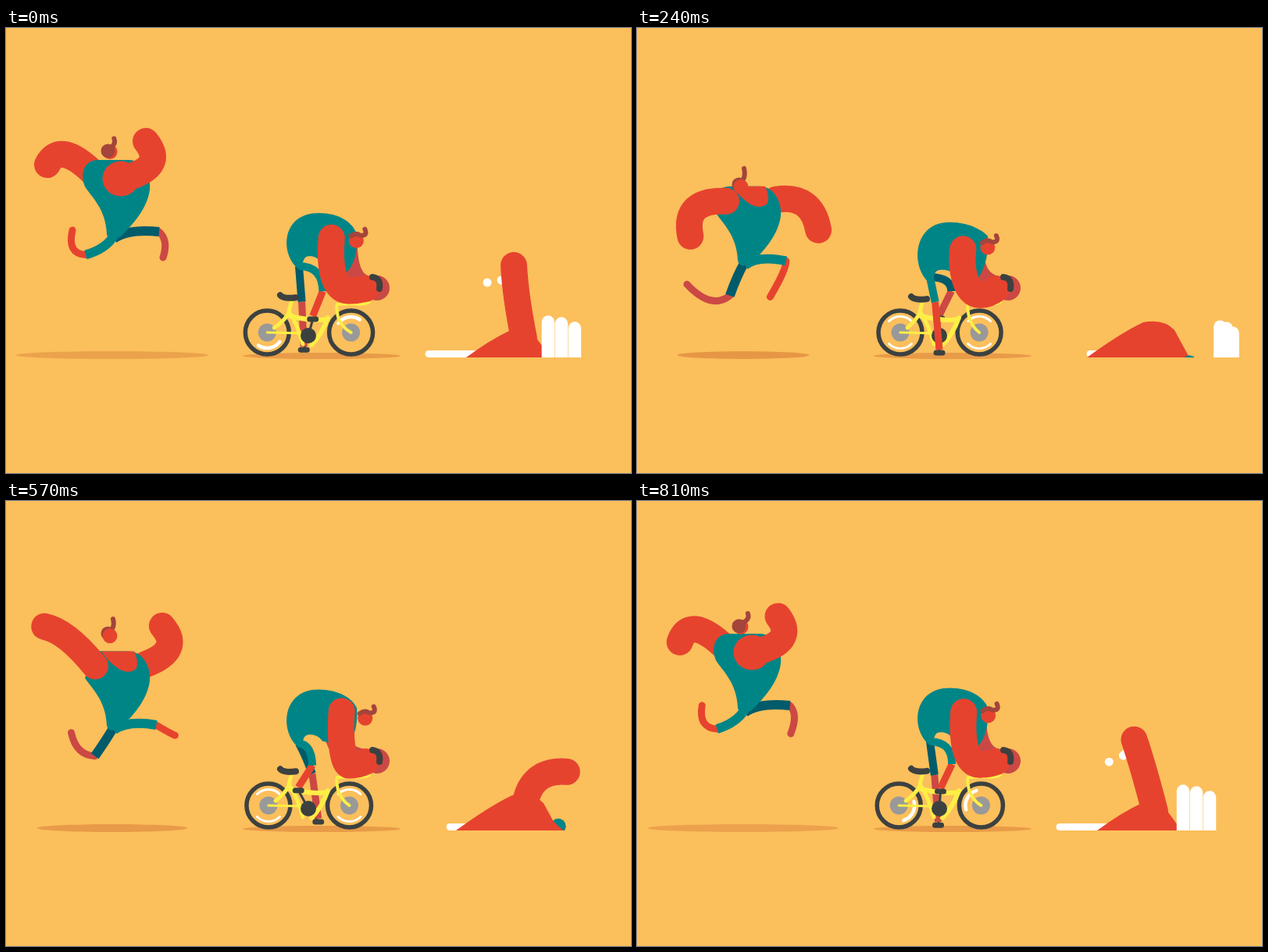
Animation, 800 px wide and 570 px high, one loop 0.84 s. Source, as an HTML page with a canvas:

```html
<!DOCTYPE html>
<html lang="en">
<head>
<meta charset="utf-8">
<title>Triathlon</title>
<style>
html, body { margin: 0; width: 100%; height: 100%; overflow: hidden; background: #fbbf5b; }
canvas { display: block; }
</style>
</head>
<body>
<canvas id="stage" width="800" height="570"></canvas>
<script>
const ctx = document.getElementById('stage').getContext('2d');
const { cos, sin, max, min, PI, exp, floor } = Math;
const LOOP = 840, HALF = LOOP / 2, STEP = 30;
const SAND = '#fbbf5b', RED = '#e6432f', PINK = '#cb4844', TEAL = '#008587', DEEP = '#005b6a',
  BROWN = '#a3453b', YELLOW = '#fdee46', DARK = '#3c4140', GREY = '#999', WHITE = '#fff';

function fill(color, d) {
  ctx.fillStyle = color;
  ctx.fill(new Path2D(d));
}
function line(color, width, d, cap = 'round') {
  ctx.strokeStyle = color;
  ctx.lineWidth = width;
  ctx.lineCap = cap;
  ctx.lineJoin = 'round';
  ctx.stroke(new Path2D(d));
}
function oval(color, x, y, rx, ry = rx) {
  ctx.fillStyle = color;
  ctx.beginPath();
  ctx.ellipse(x, y, rx, ry, 0, 0, 2 * PI);
  ctx.fill();
}
function arc(color, width, x, y, r, mid, span) {
  ctx.strokeStyle = color;
  ctx.lineWidth = width;
  ctx.lineCap = 'round';
  ctx.beginPath();
  ctx.arc(x, y, r, (mid - span / 2) * PI / 180, (mid + span / 2) * PI / 180);
  ctx.stroke();
}

// Runner and swimmer share a beat: s runs from -1 to 1 within each half loop,
// early falls to 0 in its first third, and the body turns over (open) every half loop.
function beat(t) {
  const phase = ((t + HALF / 2) % HALF) / HALF * 2 - 1;
  const contact = phase === -1;
  const s = contact ? 1 : phase;
  return { s, contact, early: max(0, -phase - .3), open: t > HALF / 2 && t <= HALF * 1.5 };
}

// Runner: y is measured from the shoulder line, which follows a parabola.
function runner({ s, contact, early, open }) {
  const q = s * s;
  oval(`rgba(200,95,40,${.3 + .16 * q})`, 136, 419, 123 - 52.5 * q, 5);
  ctx.save();
  ctx.translate(0, 169 + 46 * q);

  const backArm = () => line(RED, 34,
    `M114 19Q${69 + 12 * s} ${-26 + 76 * early} ${53 - 11 * s + 8 * q} ${6 - 32 * s + 3 * q - 45 * q * s}`);
  const frontArm = () => {
    const shift = open ? 0 : -28;
    const x = 207 - 9 * s + 10 * q - 16 * q * s, y = -24 - 12 * s + 125 * early;
    line(RED, 34, `M${178 + shift} ${open ? 17 : 24}Q${234 - 14 * q + shift} ${10 - 8 * s - 10 * q} ${x + shift} ${y}`);
    if (!open) oval(RED, 147, 24, 23.5, 22.5);
  };
  const backLeg = (skin, cloth) => {
    const x = 102 + 23 * q, y = 121.5 + 25 * q;
    line(skin, 9, `M${x} ${y}Q${x - 24} ${y - 1 + 36 * early} ${85 + 10 * s - 17 * q} ${90 - 8 * s + 39 * q}`);
    line(cloth, 12, `M138 97Q128 114 ${x} ${y}`, 'butt');
  };
  const frontLeg = (skin, cloth) => {
    const x = 196 - 7 * q, y = 92 + 5 * q;
    const footX = 201 + 28 * s - 9 * q;
    line(skin, 9, `M${x} ${y}Q${x + (footX - 170) * .4} ${y + 11} ${footX} ${125 - 22 * s - 3 * q}`);
    line(cloth, 12, `M138 101Q156 88 ${x} ${y}`, 'butt');
  };
  const torso = () => {
    fill(TEAL, 'M118 0L157 0C176 0 186 22 184 38C181 62 163 82 147 98Q131 106 129 95C128 62 108 46 101 34C94 16 101 0 118 0Z');
    if (!open) return;
    fill(SAND, 'M94 -2L121 -2L101 34L94 34Z');
    fill(TEAL, 'M106 4Q112 0 120 0L123 0L132 20L102 34Z');
    fill(RED, 'M122 0L164 0Q170 12 167 22Q158 30 145 23Q130 13 122 0Z');
  };
  const head = () => {
    const y = -11.5 - 13 * s;
    const tipX = 137 + 8 * exp(-20 * (s + .3) ** 2), tipY = y - 16 - 9 * q;
    const curl = `M125 ${y - 2}Q${tipX + 4} ${y - 5} ${tipX} ${tipY}`;
    if (open) oval(BROWN, 130.5, y - 2, 9);
    else oval(RED, 133, y + 1, 9.5);
    line(BROWN, 6, curl);
    if (open) oval(RED, 133, y + 1, 9.5);
    else oval(BROWN, 130.5, y, 9);
  };

  if (contact) {
    // Limbs smear as the runner turns over on landing.
    line(PINK, 8, 'M101 127Q117 137 136 141');
    torso();
    line(open ? TEAL : DEEP, 12, 'M139 98L137 132', 'butt');
    fill(open ? RED : PINK, 'M146 82Q185 91 225 87Q231 87 229 93C211 146 174 183 133 205Q126 207 126 200Q128 155 131 130Z');
    head();
    fill(RED, open
      ? 'M35 -48C37 -66 60 -66 67 -49C80 -27 96 -13 112 -10Q128 -13 134 0L147 22Q160 54 158 86Q160 108 145 110C86 118 48 91 31 61C13 33 12 -16 35 -48Z'
      : 'M124 24Q126 4 145 0Q161 -8 156 -37C158 -58 184 -62 192 -43C217 -5 211 50 178 82Q148 112 112 107Q90 104 99 81Q123 54 124 24Z');
  } else if (open) {
    frontArm();
    backLeg(PINK, DEEP);
    torso();
    frontLeg(RED, TEAL);
    head();
    backArm();
  } else {
    backArm();
    frontLeg(PINK, DEEP);
    torso();
    backLeg(RED, TEAL);
    head();
    frontArm();
  }
  ctx.restore();
}

// Cyclist: the crank turns once per loop, hurrying through the down stroke.
function leg(t, hipY, skin, cloth) {
  const a = (180 * t / HALF + 50 - 34 * cos(2 * PI * t / HALF + .2)) * PI / 180;
  const footX = 387 + 20 * sin(a), footY = 394 - 22 * cos(a) + 10 * min(0, sin(a));
  const kneeX = 392 + 16 * cos(a - .87), kneeY = 344 - 7 * cos(a);
  const bend = .5 + .5 * cos(a);
  const midX = 375 + (kneeX - 375) * (1 + bend) / 2, midY = hipY + (1 - bend) * (kneeY - hipY) / 2;
  line(DARK, 3, `M387 394L${footX} ${footY}`);
  line(skin, 9, `M${kneeX} ${kneeY}L${footX} ${footY - 4}`, 'butt');
  line(cloth, 10, `M375 ${hipY}Q${midX} ${midY} ${kneeX} ${kneeY}`, 'butt');
  line(DARK, 7, `M${footX - 4} ${footY}L${footX + 4} ${footY}`);
}

function wheel(x, angle, blurred) {
  arc(DARK, 5.5, x, 390, 28, 0, 360);
  oval(GREY, x, 390, 11.5);
  if (blurred) {
    arc(WHITE, 3, x, 390, 20.5, 270, 90);
    arc(WHITE, 3, x, 390, 20.5, 90, 90);
  } else arc(WHITE, 4.5, x, 390, 20, angle, 88);
}

function cyclist(t) {
  const turn = 2 * PI * t / LOOP;
  const u = 6 - 7 * cos(2 * turn - .75);
  const lean = -cos(turn - .85);
  const squeeze = min(3, u * .35);
  const rear = 334 + squeeze, front = 442 - squeeze * 1.3;
  const hipY = 304 + u * 1.2;
  const angle = 80 + 4 * 360 * t / LOOP, blurred = cos(2 * turn) < .3;

  oval('rgba(200,95,40,.38)', 404, 420, 101, 4);
  leg(t + HALF, hipY, PINK, DEEP);
  const far = 430 - 9 * lean - u * .5;
  line(PINK, 28, `M${far} ${268 + u * .4}C${far} 298 ${far + 3} 333 472 333`);

  wheel(rear, angle, blurred);
  wheel(front, angle + 180, blurred);
  line(YELLOW, 3, `M${rear} 390L380 391`);
  line(YELLOW, 5, `M${rear + 9} 384Q358 374 363 363M366 348L362 363Q374 381 380 405`);
  line(YELLOW, 6, 'M364 369Q392 376 411 373M412 371Q404 393 391 406');
  line(YELLOW, 4, `M465 351Q457 355 445 353L424 354Q422 357 425 370Q429 383 ${front} 390`);
  oval(DARK, 387, 394, 10);
  const seat = 342 + squeeze * .7;
  line(DARK, 8, `M351 ${seat}Q355 ${seat + 5} 371 ${seat + 3}`);

  leg(t, hipY, RED, TEAL);
  const top = 236 + u, low = 307 + u * 1.5, gap = 290 + u * 1.5;
  fill(TEAL, `M374 ${low}C350 ${low - 20} 353 ${top} 400 ${top}C427 ${top} 444 ${top + 12} 449 ${264 + u * .2}
    C451 290 444 ${303 + u * .6} 437 ${312 + u * .6}L405 ${302 + u}C399 ${gap} 388 ${gap} 384 ${gap + 2}Q379 ${gap + 5} 380 ${low}Z`);
  oval(PINK, 475, 333, 16);
  const armX = 422 + 8 * lean, armY = 268 + u * .9 + 4 * sin(turn), elbow = 336 + u * .45;
  line(RED, 34, `M${armX} ${armY}C${armX - 3} 305 ${armX + 2} ${elbow + 2} 440 ${elbow}Q450 ${elbow} 460 334`);
  line(DARK, 8, 'M469 319Q480 320 478 334');
  const x = 453 + 7 * lean, y = 273 + u * .7 + 1.5 * lean;
  oval(RED, x, y, 9.5);
  line(BROWN, 6, `M${x - 7} ${y - 6}Q${x - 1} ${y - 11} ${x + 5} ${y - 7}Q${x + 15} ${y - 6} ${x + 11} ${y - 15}`);
}

// Swimmer: everything is cut off at the water line.
function swimmer({ s, contact, early, open }) {
  const left = open ? 576 : 589, right = open ? 707 : 697, crest = open ? 377 : 386;
  const late = max(0, s);
  const splash = () => {
    const sink = 1500 * max(0, s + .15) ** 3;
    for (let i = 0; i < 3; i++) {
      const x = 699 + 85 * early - min(7, sink) + i * (17 - 16 * early);
      line(WHITE, 16.5, `M${x} ${371.5 + 2 * i * i + 20 * early + sink}L${x} 450`);
    }
  };
  const drops = () => {
    const n = min(0, s) ** 2;
    const x = 616 + 25 * s - 400 * n, y = 326 + 100 * s * s + 300 * n;
    oval(WHITE, x, y, max(0, 5.5 - 11 * max(0, s - .25)));
    if (s < .2) line(WHITE, 11, `M${x + 18} ${y - 3 - 250 * n}L${x + 18 + 200 * n} ${y - 3 - 400 * n}`);
  };

  ctx.save();
  ctx.beginPath();
  ctx.rect(500, 0, 300, 422);
  ctx.clip();
  line(WHITE, 9, `M${541 + 38 * late + 70 * early} 417.5L${left + 18} 417.5`);
  if (s > .2 && s < .4) line(WHITE, 8.5, 'M519.5 417.5L522.5 417.5');

  if (contact) {
    line(WHITE, 16.5, 'M772 392L772 450');
    fill(RED, `M589 422Q622 401 665 392Q692 380 730 359Q746 354 753 366L764 387L764 422Z`);
  } else {
    drops();
    if (open) splash();
    if (s > -.8) line(RED, 34, `M663 398Q${652 + 22 * s} 343 ${650 + 95 * s} ${304 + 84 * s * s + 150 * early}`);
    fill(RED, `M${left} 422Q620 ${crest + 13} 648 ${crest}Q${right - 33} ${crest - 5} ${right - 19} ${crest + 10}L${right} 422Z`);
    if (!open) splash();
    if (!open && s > .4 && s < .75) oval(WHITE, 665.5, 420.5, 8.5);
    if (open) {
      const y = 405 + 45 * s ** 4;
      oval(RED, 707, y, 9.5);
      fill(TEAL, `M700 ${y - 7}A9.5 9.5 0 0 1 714 ${y + 6}Z`);
    }
  }
  ctx.restore();
}

function draw(now) {
  const t = floor(now % LOOP / STEP) * STEP;
  ctx.fillStyle = SAND;
  ctx.fillRect(0, 0, 800, 570);
  runner(beat(t));
  cyclist(t);
  swimmer(beat(t));
}

const start = performance.now();
function tick() {
  draw(performance.now() - start);
  requestAnimationFrame(tick);
}
tick();
</script>
</body>
</html>
```
